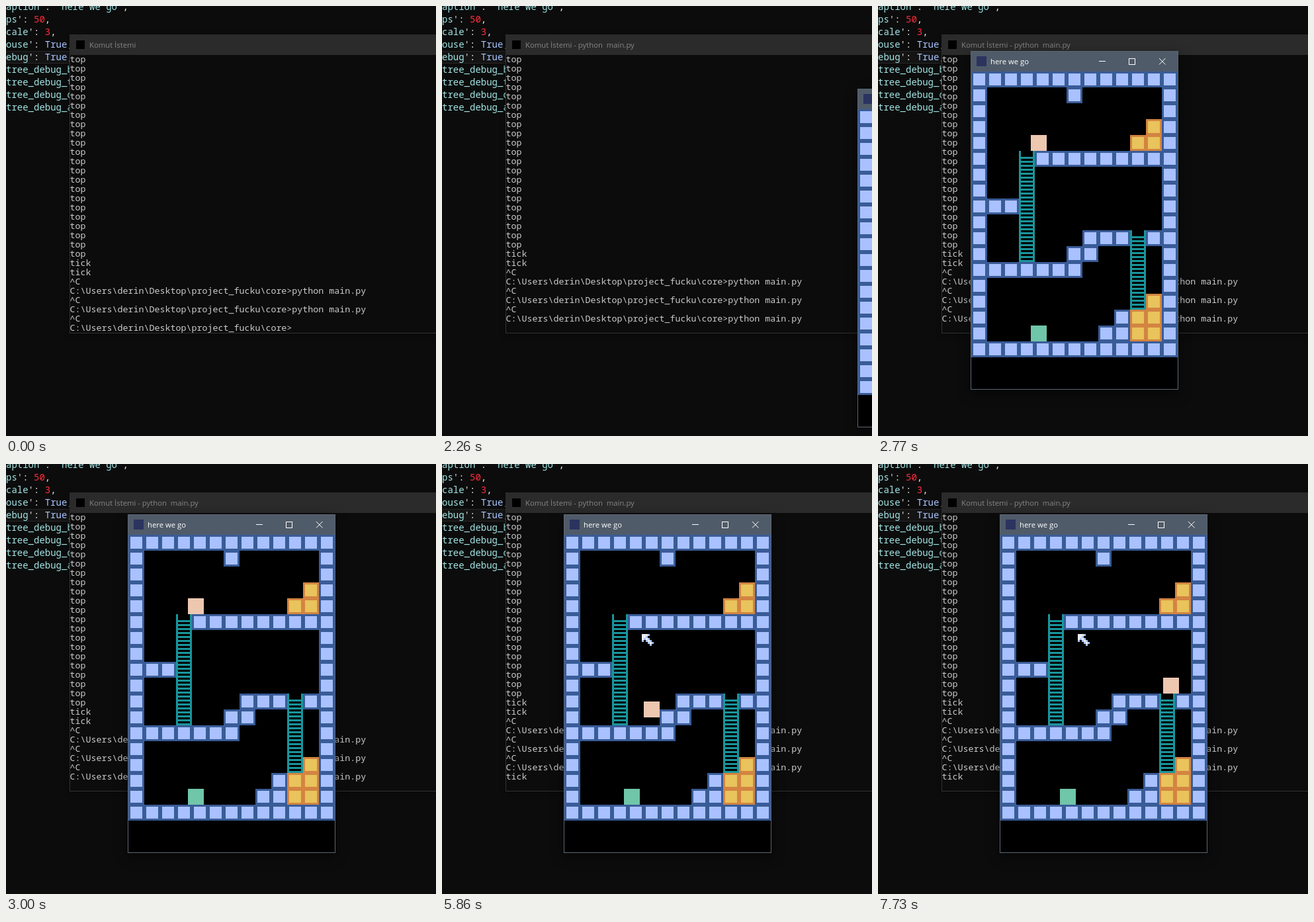
An HTML page for the animation above (7990 ms loop, 650 by 650 pixels).

```html
<!DOCTYPE html>
<html lang="en">
<head>
<meta charset="utf-8">
<title>Platformer test run</title>
<style>
  html, body { margin: 0; width: 100%; height: 100%; overflow: hidden; background: #0c0c0c; }
  svg { display: block; width: 650px; height: 650px; }
  text { white-space: pre; }
  rect, .crisp { shape-rendering: crispEdges; }
  .code { font: 14px "Noto Sans Mono", "DejaVu Sans Mono", monospace; fill: #e6e6e6; }
  .key { fill: #a3e4e4; }
  .num { fill: #ff2c3c; }
  .bool { fill: #a9c6ff; }
  .term { font: 13.333px "Noto Sans Mono", "DejaVu Sans Mono", monospace; fill: #cccccc; }
  .title { font: 11.3px "Open Sans", "Noto Sans", sans-serif; fill: #fff; }
  .bar { fill: #2b2b2b; }
  .console .title { fill: #868686; }
  .console.active .bar { fill: #505b69; }
  .console.active .title { fill: #fff; }
  .console { filter: drop-shadow(0 4px 5px rgba(0, 0, 0, .25)); }
  .console.active { filter: drop-shadow(0 5px 9px rgba(0, 0, 0, .5)); }
  .frame { filter: drop-shadow(0 6px 9px rgba(0, 0, 0, .5)); }
</style>
</head>
<body>
<svg viewBox="0 0 650 650">
  <defs><clipPath id="screen"><rect x="97" y="74" width="553" height="420"/></clipPath></defs>

  <rect width="650" height="650" fill="#0c0c0c"/>
  <rect y="68" width="100" height="19" fill="#262626"/>
  <rect y="69" width="100" height="17" fill="#141414"/>
  <g id="editor"></g>

  <g id="console" class="console">
    <rect x="96" y="43" width="600" height="452" fill="#333"/>
    <rect x="97" y="73" width="600" height="421" fill="#0c0c0c"/>
    <rect class="bar" x="96" y="43" width="600" height="31"/>
    <rect x="106" y="52" width="13" height="13" fill="#000"/>
    <text id="caption" class="title" x="126" y="63"></text>
    <g clip-path="url(#screen)"><g id="lines"></g></g>
  </g>

  <g id="win">
    <rect class="frame" width="314" height="512" fill="#5c6672"/>
    <rect x="1" y="1" width="312" height="30" fill="#505b69"/>
    <rect x="9" y="8" width="15" height="15" fill="#2b335f"/>
    <text class="title" x="30" y="20">here we go</text>
    <g fill="none" stroke="#fff">
      <path class="crisp" d="M194 15.5h10M239.5 11.5h9v9h-9z"/>
      <path d="M285 11l9.5 9.5M294.5 11L285 20.5"/>
    </g>
    <g transform="translate(1 31)">
      <rect width="312" height="480" fill="#000"/>
      <g id="level"></g>
      <rect x="90" y="384" width="24" height="24" fill="#70c6a9"/>
      <rect id="player" width="24" height="24" fill="#edc7b0"/>
      <g id="pointer"></g>
    </g>
  </g>
</svg>
<script>
const LOOP = 7990, PX = 3, TILE = 24;
const $ = id => document.getElementById(id);

function add(parent, tag, attrs, text) {
  const el = document.createElementNS('http://www.w3.org/2000/svg', tag);
  for (const k in attrs) el.setAttribute(k, attrs[k]);
  if (text) el.textContent = text;
  parent.appendChild(el);
  return el;
}
const box = (parent, x, y, width, height, fill) =>
  add(parent, 'rect', { x, y, width, height, fill });

// Editor: each line is a list of [class, text] spans
const setting = (name, cls, value) => [['key', name], ['', "': "], [cls, value], ['', ',']];
[
  [['key', 'aption'], ['', "': '"], ['key', 'here we go'], ['', "',"]],
  setting('ps', 'num', '50'),
  setting('cale', 'num', '3'),
  setting('ouse', 'bool', 'True'),
  setting('ebug', 'bool', 'True'),
  ...['b', 't', 'd', 'a'].map(c => [['key', 'tree_debug_' + c]])
].forEach((spans, i) => {
  const line = add($('editor'), 'text', { class: 'code', x: 0, y: 6 + 19 * i });
  spans.forEach(([cls, s]) => add(line, 'tspan', { class: cls }, s));
});

// Console output
const PROMPT = 'C:\\Users\\derin\\Desktop\\project_fucku\\core>', COMMAND = 'python main.py';
const output = [
  ...Array(22).fill('top'), 'tick', 'tick',
  '^C', PROMPT + COMMAND, '^C', PROMPT + COMMAND, '^C', PROMPT, 'tick'
];
const rows = output.map((s, i) =>
  add($('lines'), 'text', { class: 'term', x: 96.5, y: 85 + 14 * i }, s));
const [lastPrompt, lastTick] = rows.slice(-2);

// Level
const LEVEL = `
#############
#.....#.....#
#...........#
#..........o#
#.........oo#
#..H#########
#..H........#
#..H........#
###H........#
#..H........#
#..H...###H##
#..H..##..H.#
#######...H.#
#.........H.#
#.........Ho#
#........#oo#
#.......##oo#
#############`.trim().split('\n');
const BLOCKS = { '#': ['#395c98', '#a9c1ff'], o: ['#d38441', '#e9c35b'] };

LEVEL.forEach((row, r) => [...row].forEach((c, col) => {
  const x = col * TILE, y = r * TILE, level = $('level');
  if (BLOCKS[c]) {
    box(level, x, y, TILE, TILE, BLOCKS[c][0]);
    box(level, x + PX, y + PX, TILE - 2 * PX, TILE - 2 * PX, BLOCKS[c][1]);
  } else if (c === 'H') {
    const teal = '#19959c', isTop = LEVEL[r - 1][col] !== 'H';
    box(level, x, y, PX, TILE, teal);
    box(level, x + TILE - PX, y, PX, TILE, teal);
    for (let k = isTop ? 3 : 1; k < 8; k += 2) box(level, x, y + k * PX, TILE, PX, teal);
  }
}));

['7776', '776', '7676', '6.676', '...676', '....6'].forEach((row, r) =>
  [...row].forEach((c, col) => {
    if (c !== '.') box($('pointer'), col * PX, r * PX, PX, PX, c === '7' ? '#eeeeee' : '#a9c1ff');
  }));

// Tracks hold [time, x, y] and keep each value until the next one
const at = (track, t) => track.findLast(k => k[0] <= t);

const windowTrack = [
  [2260, 628, 125], [2310, 540, 122], [2360, 390, 114], [2400, 230, 104],
  [2440, 102, 94], [2490, 80, 86], [2620, 86, 84], [2670, 100, 79],
  [2720, 120, 72], [2770, 140, 68], [2820, 156, 66], [2860, 168, 68],
  [2900, 176, 71], [2950, 181, 74], [3000, 184, 76]
];
const pointerTrack = [[3050, 111, 105], [3080, 117, 150]];

const playerTrack = [[0, 90, 96]];
function run(from, to, count, place) {
  for (let i = 0; i < count; i++)
    playerTrack.push([from + (to - from) * i / (count - 1), ...place(i)]);
}
function walk(from, to, y, xs) {
  run(from, to, xs.length, i => [xs[i], y]);
}
// Rises 42, clears the ledge on the third step and lands 24 higher
const RISE = [12, 24, 33, 39, 42, 42, 39, 33, 27];
function jump(from, to, count, x, y, wall) {
  run(from, to, count, i => [
    Math.min(wall, x + 12 * Math.max(0, i - 1)),
    y - (i === count - 1 ? 24 : RISE[i])
  ]);
}
walk(3360, 3640, 96, [78, 66, 60, 72, 90, 102]);
walk(3790, 3820, 96, [90, 78]);
playerTrack.push([4150, 72, 126]);
run(4380, 5170, 18, i => [72, 126 + PX * Math.round(7 * (i + 1) / PX)]);
run(5220, 5270, 2, i => [72, 258 + 6 * i]);
walk(5450, 5580, 264, [84, 96, 108, 120]);
jump(5860, 6290, 9, 120, 264, 144);
jump(6790, 7220, 10, 144, 240, 228);
walk(7400, 7480, 216, [240, 252, 258]);
walk(7680, 7730, 216, [252, 246]);

function place(el, track, t) {
  const key = at(track, t);
  el.style.display = key ? '' : 'none';
  if (key) el.setAttribute('transform', `translate(${key[1]} ${key[2]})`);
}

function draw(t) {
  $('console').classList.toggle('active', t >= 320 && t < 1240);
  $('caption').textContent = 'Komut İstemi' + (t >= 1150 ? ' - python  main.py' : '');
  lastPrompt.textContent = PROMPT + (t >= 830 ? COMMAND : '');
  lastTick.style.display = t >= 4150 ? '' : 'none';
  const scroll = t >= 4150 ? 2 : t >= 1060 ? 1 : 0;
  $('lines').setAttribute('transform', `translate(0 ${-14 * scroll})`);
  place($('win'), windowTrack, t);
  place($('pointer'), pointerTrack, t);
  place($('player'), playerTrack, t);
}

const start = performance.now();
function tick() {
  draw((performance.now() - start) % LOOP);
  requestAnimationFrame(tick);
}
tick();
</script>
</body>
</html>
```
